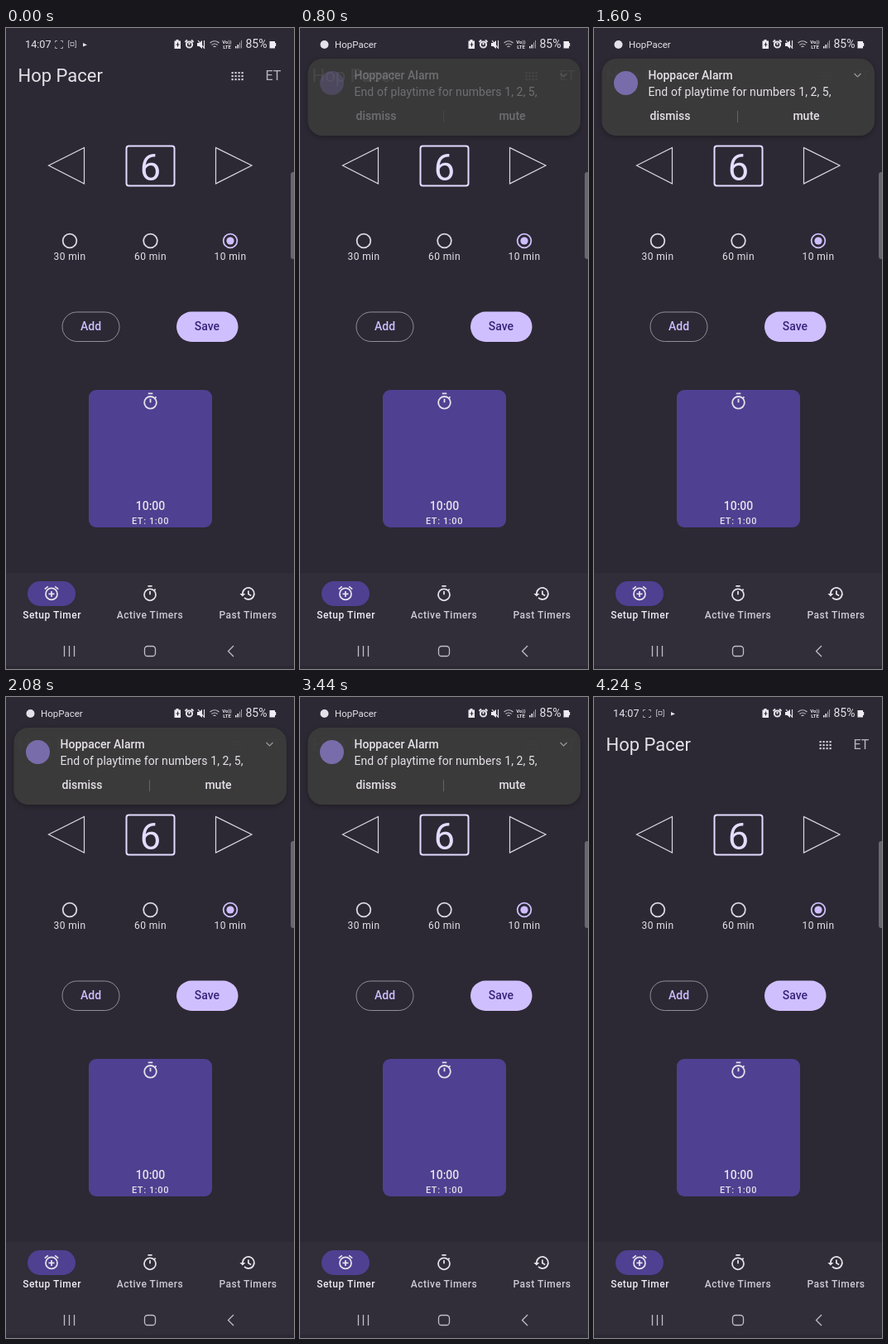
Animation of 348 by 774 pixels, one loop 4320 ms. Source, as an HTML page:

```html
<!DOCTYPE html>
<html lang="en">
<head>
<meta charset="utf-8">
<title>Timer alarm</title>
<style>
html, body { margin: 0; width: 100%; height: 100%; overflow: hidden; background: #2c2934; }
svg { display: block; width: 348px; height: 774px; font-family: Roboto, "Noto Sans", sans-serif; }
text { fill: #e6e1e9; }
.mid { text-anchor: middle; }
.line { fill: none; stroke: #dcd8e2; }
.small { font-size: 12px; letter-spacing: .4px; }
.tab { font-size: 12px; font-weight: 500; letter-spacing: .5px; fill: #cfcad5; }
.label { font-size: 14px; font-weight: 500; }
.icon { fill: none; stroke: #e6e1e9; stroke-width: 2; }
</style>
</head>
<body>
<svg viewBox="0 0 348 774">
  <defs>
    <symbol id="watch" viewBox="0 0 24 24">
      <path class="icon" d="M9 2h6M12 9v5M18 8l1.6-1.6"/>
      <circle class="icon" cx="12" cy="14" r="8"/>
    </symbol>
    <symbol id="alarm" viewBox="0 0 24 24">
      <path class="icon" d="M2.6 6.5l4.6-3.8M21.4 6.5l-4.6-3.8M12 9v8M8 13h8"/>
      <circle class="icon" cx="12" cy="13" r="8"/>
    </symbol>
    <symbol id="past" viewBox="0 0 24 24">
      <path class="icon" d="M5 12a8 8 0 1 1 2.4 5.7M13 8v4.6l3.8 2.2"/>
      <path d="M1 12h8l-4 4z" fill="#e6e1e9"/>
    </symbol>
    <filter id="shadow" x="-10%" y="-30%" width="120%" height="170%">
      <feDropShadow dx="0" dy="2" stdDeviation="3" flood-color="#000" flood-opacity=".3"/>
    </filter>
  </defs>

  <rect width="348" height="774" fill="#2c2934"/>

  <!-- header -->
  <text x="14.5" y="65" font-size="22">Hop Pacer</text>
  <g id="dots" fill="#d0ccd6"></g>
  <text x="313.5" y="63" font-size="16" style="fill:#b9b5c0">ET</text>

  <!-- number picker -->
  <path class="line" stroke-width="1.2" d="M51.500 166L94.500 144.500V188zM297 166L253.500 144.500V188z"/>
  <rect class="line" x="145.500" y="142.500" width="58" height="48" rx="3" stroke-width="2" style="stroke:#e4dcff"/>
  <text class="mid" x="174.500" y="183.500" font-size="45" style="fill:#e4dcff">6</text>

  <!-- durations -->
  <g class="line" stroke-width="1.800">
    <circle cx="77" cy="257" r="8.300"/>
    <circle cx="174.500" cy="257" r="8.300"/>
    <circle cx="271" cy="257" r="8.300" stroke="#cfbeff"/>
  </g>
  <circle cx="271" cy="257" r="4.600" fill="#cfbeff"/>
  <g class="mid small">
    <text x="77" y="280">30 min</text>
    <text x="174.500" y="280">60 min</text>
    <text x="271" y="280">10 min</text>
  </g>

  <!-- buttons -->
  <rect x="68" y="343" width="69" height="35.500" rx="17.700" fill="none" stroke="#938f99"/>
  <rect x="206" y="342.500" width="74.500" height="36.500" rx="18.200" fill="#d0bfff"/>
  <text class="mid label" x="102.500" y="365" style="fill:#cfbeff">Add</text>
  <text class="mid label" x="243" y="365" style="fill:#37247a">Save</text>

  <!-- timer card -->
  <rect x="100" y="437" width="149" height="166" rx="9" fill="#4f4091"/>
  <use href="#watch" x="163.500" y="439.500" width="22" height="22"/>
  <text class="mid label" x="174.500" y="582">10:00</text>
  <text class="mid" x="174.500" y="599" font-size="11" font-weight="500" letter-spacing=".6">ET: 1:00</text>

  <!-- bottom tabs -->
  <rect y="658" width="348" height="112" fill="#312d39"/>
  <rect x="26" y="668" width="58" height="30" rx="15" fill="#4f4091"/>
  <use href="#alarm" x="44.500" y="672" width="21" height="21"/>
  <use href="#watch" x="163.500" y="672" width="21" height="21"/>
  <use href="#past" x="281.500" y="672.500" width="21" height="21"/>
  <g class="mid">
    <text class="tab" x="55.500" y="713" style="fill:#f0ecf4">Setup Timer</text>
    <text class="tab" x="174" y="713">Active Timers</text>
    <text class="tab" x="292.500" y="713">Past Timers</text>
  </g>
  <g class="line" stroke-width="1.300" style="stroke:#c2bec8">
    <path d="M70.500 746v13M76.500 746v13M82.500 746v13M275 746l-6.500 6.500 6.500 6.500"/>
    <rect x="167.500" y="746.500" width="13" height="12" rx="3.500"/>
  </g>
  <rect x="344" y="174" width="8" height="105" rx="3" fill="#69666f"/>

  <!-- status bar -->
  <g id="clock">
    <text x="23" y="24" font-size="12.700">14:07</text>
    <g class="line" style="stroke:#aaa6b0">
      <path d="M62 15.500h-2.500v2M66 15.500h2.500v2M62 24.500h-2.500v-2M66 24.500h2.500v-2M77 15.500h-1.500v8h1.500M83 15.500h1.500v8h-1.500"/>
      <rect x="78" y="17.500" width="4" height="4"/>
    </g>
    <path d="M93 18l5 2.500-5 2z" fill="#e6e1e9"/>
  </g>
  <g id="app">
    <circle cx="29.500" cy="20" r="5" fill="#e6e1e9"/>
    <text x="42" y="24" font-size="11.500">HopPacer</text>
  </g>
  <g fill="#f0ecf4">
    <path d="M205.500 15.500h3v-1.500h-3zM203.500 15.500h7.500v9.500h-7.500z"/>
    <path d="M207.500 17.500v5M205.500 20h4" stroke="#2c2934"/>
    <circle cx="221.500" cy="20" r="3.600" class="icon"/>
    <path class="icon" stroke-width="1.500" d="M216.500 17l2.500-2.500M226.500 17l-2.500-2.500M221.500 18v2.500"/>
    <path d="M231 18h2.500l3.500-3v10l-3.500-3H231z"/>
    <path class="icon" style="stroke-width:1.200" d="M232 15l8 10M239.500 15v9"/>
    <g class="icon" style="stroke-width:1.200;stroke:#bdb9c3">
      <path d="M246.500 18q5.500-4.500 11 0M248.500 20.500q3.500-3 7 0M250.500 22.800q1.500-1.300 3 0"/>
    </g>
    <text class="mid" x="267" y="19" font-size="6" font-weight="700">Vo))</text>
    <text class="mid" x="267" y="25" font-size="6" font-weight="700">LTE</text>
    <path d="M277 22h1.500v2.500H277zM279.500 20h1.500v4.500h-1.500z"/>
    <path d="M282 17.500h1v7h-1zM284 15h1v9.500h-1z" opacity=".6"/>
    <text x="289.500" y="24" font-size="14">85%</text>
    <path d="M318.500 16h6.500v2h1.200v4H325v2.500h-6.500z"/>
  </g>

  <!-- heads-up notification -->
  <g id="note">
    <rect id="panel" x="9.500" y="37" width="329.500" height="93" rx="18" fill="#3b3b3b" filter="url(#shadow)"/>
    <g id="content">
      <circle cx="38.500" cy="66.500" r="14.500" fill="#796caa"/>
      <text class="label" x="65.500" y="62">Hoppacer Alarm</text>
      <text x="65.500" y="81.500" font-size="14" letter-spacing=".08">End of playtime for numbers 1, 2, 5,</text>
      <text class="mid label" x="92" y="111">dismiss</text>
      <text class="mid label" x="256.500" y="111">mute</text>
      <path d="M173.500 100v14" stroke="#66646a"/>
      <path d="M314.500 55l4 4 4-4" fill="none" stroke="#9a989e" stroke-width="1.200"/>
    </g>
  </g>
</svg>
<script>
const LOOP = 4320, STEP = 80;
const $ = id => document.getElementById(id);
const ramp = (t, from, to) => Math.min(1, Math.max(0, (t - from) / (to - from)));
const fade = (id, value) => $(id).setAttribute("opacity", value);

let dots = "";
for (let i = 0; i < 12; i++)
  dots += `<rect x="${272.5 + i % 4 * 4}" y="${53 + (i >> 2) * 4}" width="2.2" height="2.2"/>`;
$("dots").innerHTML = dots;

function draw(now) {
  const t = Math.floor(now % LOOP / STEP) * STEP;
  const leave = ramp(t, 3500, 3760);
  const grow = 1 - (1 - ramp(t, 550, 720)) ** 2;
  const height = 3 + 90 * grow;

  fade("clock", t < 2000 ? 1 - ramp(t, 400, 584) : ramp(t, 3800, 4000));
  fade("app", ramp(t, 580, 700) * (1 - ramp(t, 3660, 3820)));

  const panel = $("panel");
  panel.setAttribute("height", height);
  panel.setAttribute("rx", Math.min(18, height / 2));
  fade("panel", t < 550 ? 0 : .15 + .77 * ramp(t, 550, 760) + .065 * ramp(t, 800, 1040));
  fade("content", ramp(t, 710, 1000));
  fade("note", 1 - leave);
  $("note").setAttribute("transform", `translate(0 ${-14 * leave * leave})`);
  requestAnimationFrame(() => draw(performance.now() - start));
}
const start = performance.now();
draw(0);
</script>
</body>
</html>
```
